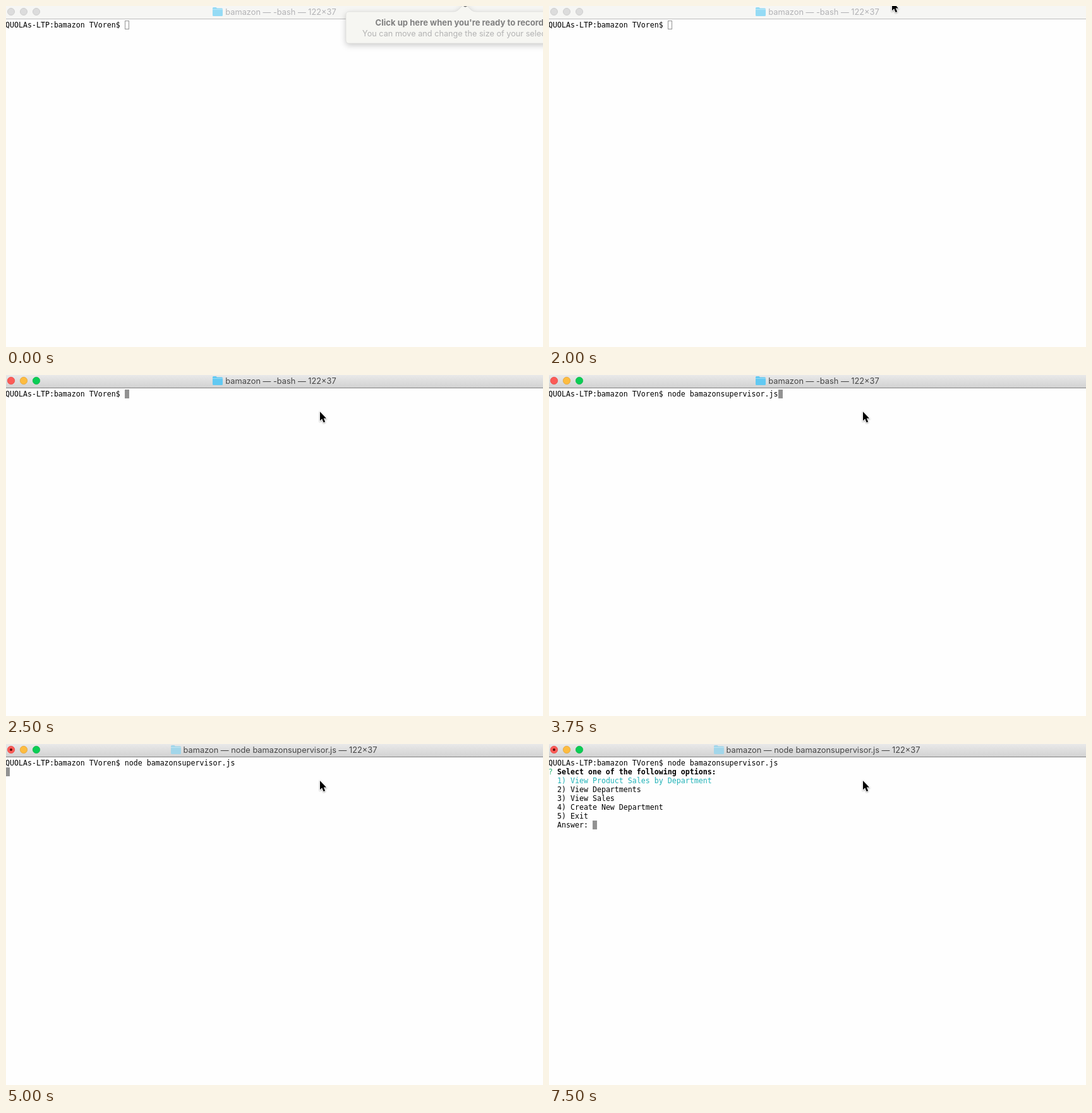
These frames come from a looping animation (850 px wide and 539 px high, 8 s). An HTML page:

```html
<!DOCTYPE html>
<html lang="en">
<head>
<meta charset="utf-8">
<title>Terminal session</title>
<style>
  html, body { margin: 0; width: 100%; height: 100%; overflow: hidden; background: #fefefe; }
  svg { display: block; width: 850px; height: 539px; }
  text { white-space: pre; }
  .mono { font: 11.627px "DejaVu Sans Mono", monospace; }
  .ui { font: 12.8px Inter, Roboto, sans-serif; }
  .bold { font-weight: bold; }
  .title { text-anchor: middle; fill: #454545; }
  .caret { fill: #929292; }
  .popover { filter: drop-shadow(0 3px 5px rgba(0, 0, 0, .2)); }
</style>
</head>
<body>
<svg viewBox="0 0 850 539">
  <defs>
    <linearGradient id="bar" x2="0" y2="1">
      <stop stop-color="#e9e9e9"/><stop offset="1" stop-color="#d2d2d2"/>
    </linearGradient>
    <g id="folder">
      <path d="M0 3.5Q0 2 1.5 2H5.5L7 3.5H14.5Q16 3.5 16 5V14.5Q16 16 14.5 16H1.5Q0 16 0 14.5Z"/>
      <path d="M0 5.5H16" stroke="#fff" stroke-opacity=".35"/>
    </g>
    <path id="arrow" d="M0 0V14.2L3.2 11.3L5.6 17L8.2 15.9L5.8 10.4H10Z" stroke="#fff" stroke-width="1.6" paint-order="stroke"
      style="filter: drop-shadow(0 1px 1px rgba(0, 0, 0, .35))"/>
  </defs>

  <!-- Elements with data-show are visible from the first to the second time, in ms. -->
  <g data-show="0 2500">
    <rect width="850" height="20" fill="#f6f6f4"/>
    <rect y="20" width="850" height="1" fill="#bdbdbd"/>
    <g fill="#dcdcdc" stroke="#cecece">
      <circle cx="8" cy="9" r="5.5"/><circle cx="28" cy="9" r="5.5"/><circle cx="48" cy="9" r="5.5"/>
    </g>
    <use href="#folder" x="327" fill="#95dbf5"/>
    <text class="ui title" x="435" y="14" style="fill:#b2b2b5">bamazon — -bash — 122×37</text>
    <rect x="188.5" y="23.5" width="6" height="13" fill="none" stroke="#939393"/>
  </g>

  <g data-show="2500 8000">
    <rect width="850" height="20" fill="url(#bar)"/>
    <rect y="20" width="850" height="1" fill="#828282"/>
    <circle cx="8" cy="9" r="5.7" fill="#fc5b57" stroke="#e2463f" stroke-width=".7"/>
    <circle cx="28" cy="9" r="5.7" fill="#fdbc40" stroke="#e0a034" stroke-width=".7"/>
    <circle cx="48" cy="9" r="5.7" fill="#0bcd55" stroke="#10b347" stroke-width=".7"/>
  </g>
  <g data-show="2500 5000">
    <use href="#folder" x="327" fill="#62c9f2"/>
    <text class="ui title" x="435" y="14">bamazon — -bash — 122×37</text>
  </g>
  <g data-show="5000 8000">
    <circle cx="8" cy="9" r="2" fill="#5c0b08"/>
    <use href="#folder" x="261" fill="#a2d6ea"/>
    <text class="ui title" x="434" y="14">bamazon — node bamazonsupervisor.js — 122×37</text>
  </g>

  <text class="mono" x="-1" y="34">QUOLAs-LTP:bamazon TVoren$ <tspan id="command"></tspan></text>
  <g data-show="6000 8000" class="mono">
    <text class="bold" x="-1" y="48"><tspan fill="#2bb573" font-weight="normal">?</tspan> Select one of the following options:</text>
    <text x="13" y="62" fill="#22b3b8">1) View Product Sales by Department</text>
    <text x="13" y="76">2) View Departments</text>
    <text x="13" y="90">3) View Sales</text>
    <text x="13" y="104">4) Create New Department</text>
    <text x="13" y="118">5) Exit</text>
    <text x="13" y="132">Answer: </text>
  </g>
  <rect id="caret" class="caret" width="7" height="14" data-show="2500 8000"/>

  <g data-show="0 250">
    <path class="popover" fill="#f6f6f2" stroke="#dcdcd9" stroke-width=".7"
      d="M543 9H708Q713 9 716 6L722 0Q726 -4 730 0L736 6Q739 9 744 9H909Q914 9 914 14V54Q914 59 909 59H543Q538 59 538 54V14Q538 9 543 9Z"/>
    <text class="ui bold" x="584.5" y="31" fill="#808080" style="font-size:13.1px">Click up here when you're ready to record.</text>
    <text class="ui" x="564" y="48" fill="#b3b3b3" style="font-size:12.7px">You can move and change the size of your selection.</text>
  </g>
  <path data-show="0 2000" d="M724 0H730L728 1.5H726Z" fill="#757575"/>
  <use id="pointer" href="#arrow" data-show="2000 8000"/>
</svg>
<script>
  const LOOP = 8000;
  const byId = id => document.getElementById(id);
  const timed = [...document.querySelectorAll('[data-show]')].map(node => {
    const [from, to] = node.dataset.show.split(' ').map(Number);
    return { node, from, to };
  });

  // Each list holds [start time, value] in order of time.
  const typing = [[0, ''], [3000, 'node '], [3750, 'node bamazonsupervisor.js']];
  const caretCells = [[0, [27, 0]], [3000, [32, 0]], [3750, [52, 0]], [4750, [0, 1]], [6000, [10, 7]]];
  const pointerSpots = [[0, [543, -7]], [2250, [497, 58]]];
  const valueAt = (steps, time) => steps.findLast(([start]) => start <= time)[1];

  function place(node, x, y) {
    node.setAttribute('x', x);
    node.setAttribute('y', y);
  }

  function draw() {
    const time = performance.now() % LOOP;
    for (const { node, from, to } of timed) {
      node.style.display = time >= from && time < to ? '' : 'none';
    }
    byId('command').textContent = valueAt(typing, time);
    const [column, row] = valueAt(caretCells, time);
    place(byId('caret'), column * 7 - 1, row * 14 + 23);
    place(byId('pointer'), ...valueAt(pointerSpots, time));
    requestAnimationFrame(draw);
  }
  draw();
</script>
</body>
</html>
```
